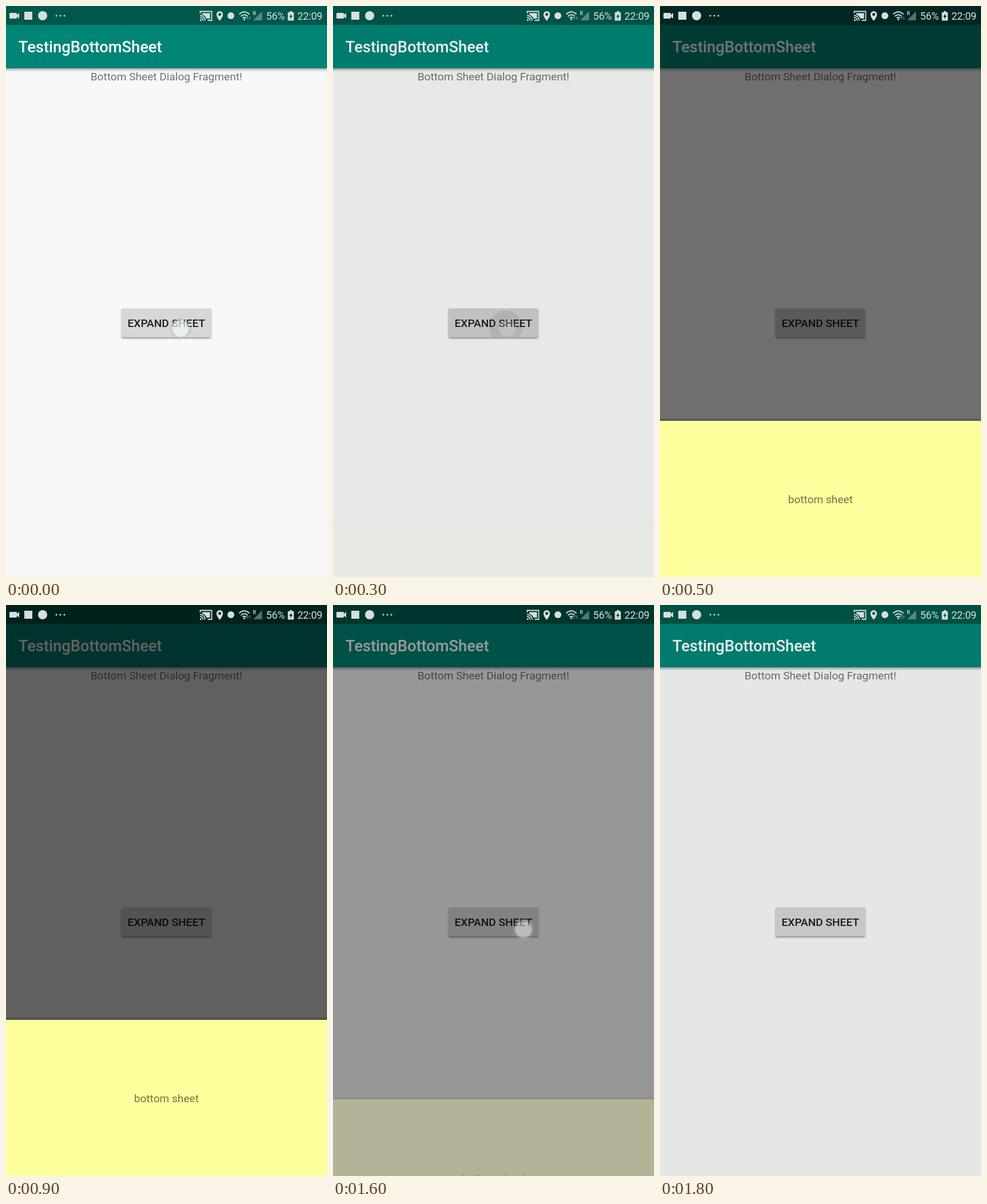
These frames come from a looping animation (561x998 px, 3800 ms). An HTML page:

```html
<!DOCTYPE html>
<html lang="en">
<head>
<meta charset="utf-8">
<title>Bottom sheet</title>
<style>
  html, body { margin: 0; width: 100%; height: 100%; overflow: hidden; }
  svg { display: block; width: 561px; height: 998px; font: 19.1px Roboto, sans-serif; }
  .medium { font-weight: 500; }
  .center { text-anchor: middle; }
  .status { font-size: 18px; letter-spacing: -.2px; }
  .line { fill: none; stroke: #d6dfdd; stroke-width: 1.8; }
</style>
</head>
<body>
<svg viewBox="0 0 561 998">
  <defs>
    <linearGradient id="shade" x2="0" y2="1">
      <stop stop-opacity=".3"/><stop offset="1" stop-opacity="0"/>
    </linearGradient>
    <radialGradient id="touch">
      <stop offset=".68" stop-color="#f4f7f7" stop-opacity=".95"/>
      <stop offset=".75" stop-color="#a4c2c6" stop-opacity=".7"/>
      <stop offset="1" stop-color="#a4c2c6" stop-opacity="0"/>
    </radialGradient>
    <filter id="soft" x="-10%" y="-20%" width="120%" height="150%">
      <feGaussianBlur stdDeviation="1.5"/>
    </filter>
    <clipPath id="buttonArea"><rect x="201.5" y="528.5" width="157.5" height="50.5" rx="2.5"/></clipPath>
  </defs>

  <!-- Activity -->
  <rect width="561" height="998" fill="#f7f9f8"/>
  <rect y="109" width="561" height="6" fill="url(#shade)"/>
  <rect width="561" height="109" fill="#008577"/>
  <rect width="561" height="33" fill="#00574b"/>
  <text class="medium" x="21.8" y="81" font-size="27.3" fill="#fff">TestingBottomSheet</text>
  <text class="center" x="280.3" y="130" fill-opacity=".54">Bottom Sheet Dialog Fragment!</text>
  <rect x="202" y="531" width="156.5" height="50" rx="2.5" fill-opacity=".4" filter="url(#soft)"/>
  <g clip-path="url(#buttonArea)">
    <rect x="201" y="528" width="159" height="52" fill="#d6d7d6"/>
    <rect id="press" x="201" y="528" width="159" height="52"/>
    <circle id="ripple" cx="302" cy="561"/>
  </g>
  <text class="medium center" x="280.3" y="561" fill="#1c1d1c">EXPAND SHEET</text>

  <!-- Dialog -->
  <rect id="dim" width="561" height="998"/>
  <g id="sheet">
    <rect y="-5" width="561" height="5" fill="url(#shade)" transform="scale(1 -1) translate(0 5)"/>
    <rect width="561" height="300" fill="#fdfe9c"/>
    <text class="center" x="280.3" y="144" fill-opacity=".54">bottom sheet</text>
  </g>

  <!-- Status bar -->
  <g fill="#d6dfdd">
    <path d="M7.5 12h10q1.500 0 1.500 1.500v2l4-3.500v10l-4-3.500v2q0 1.500-1.500 1.500h-10q-1.500 0-1.500-1.500v-7q0-1.500 1.500-1.500z"/>
    <rect x="32" y="10" width="14" height="14"/>
    <circle cx="64" cy="17" r="8"/>
    <circle cx="88" cy="17" r="1.500"/><circle cx="95" cy="17" r="1.500"/><circle cx="102" cy="17" r="1.500"/>
    <path class="line" d="M339.500 13v-3.500h20v15.500h-7M339 16.500a9 9 0 0 1 9 9M339 20a5.500 5.500 0 0 1 5.500 5.500"/>
    <path d="M343 12.500h13.500v9.500h-6q-2-5-7.500-7zM339 23a3 3 0 0 1 3 3h-3z"/>
    <path fill-rule="evenodd" d="M373.500 9a5.700 5.700 0 0 1 5.700 5.700q0 4.300-5.700 11.300q-5.700-7-5.700-11.300a5.700 5.700 0 0 1 5.700-5.700zm0 3.300a2.500 2.500 0 1 0 .1 0z"/>
    <circle cx="393" cy="17" r="6"/>
    <path class="line" d="M407.500 14.500q9-8.500 18 0M410.500 18q6-5.500 12 0M413.500 21q3-2.500 6 0"/>
    <circle cx="416.500" cy="23.300" r="1.600"/>
    <path opacity=".4" d="M420 21l2-3 2 3h-1.300v3h-1.400v-3zM424 21h1.300v-3h1.400v3h1.300l-2 3zM447.500 9.500v15.500h-15.500z"/>
    <text class="medium" x="431.500" y="16" font-size="8.500">R</text>
    <text class="status" x="454.500" y="24">56%</text>
    <path fill-rule="evenodd" d="M496 9h4v2h3v14.500h-10.500v-14.500h3.500zM499 13l-4 6h2.500l-1 4.500 4.500-6.500h-2.700z"/>
    <text class="status" x="553" y="24" text-anchor="end">22:09</text>
  </g>
  <circle id="pointer" r="20" fill="url(#touch)"/>
</svg>
<script>
const LOOP = 3800, STEP = 100;
const SHEET_TOP = 725, SHEET_TRAVEL = 193;

// Each track is a list of [time, value] points joined by straight lines.
const tracks = {
  dim: [[200, 0], [300, .065], [400, .31], [500, .55], [600, .61], [1400, .61], [1500, .55], [1600, .395], [1800, .075]],
  sheet: [[260, 0], [300, .07], [400, .75], [500, 1], [1400, 1], [1500, .82], [1600, .28], [1700, 0]],
  press: [[0, 0], [300, .035], [500, .07], [700, 0]],
  ripple: [[0, 0], [300, 29], [500, 50]],
  rippleFade: [[0, .08], [300, .08], [500, 0]],
  pointer: [[0, .75], [300, .25], [400, 0], [1300, 0], [1400, .85], [1500, .75], [1600, .52], [1800, 0]],
};

function valueAt(points, t) {
  const next = points.findIndex(([time]) => time > t);
  if (next === 0) return points[0][1];
  if (next < 0) return points.at(-1)[1];
  const [t0, v0] = points[next - 1], [t1, v1] = points[next];
  return v0 + (v1 - v0) * (t - t0) / (t1 - t0);
}

const set = (id, attributes) => {
  const element = document.getElementById(id);
  for (const name in attributes) element.setAttribute(name, attributes[name]);
};

function draw() {
  const t = Math.floor(performance.now() % LOOP / STEP) * STEP;
  const now = name => valueAt(tracks[name], t);
  const shown = now('sheet');
  set('dim', { opacity: now('dim') });
  set('sheet', { opacity: shown, transform: `translate(0 ${SHEET_TOP + SHEET_TRAVEL * (1 - shown)})` });
  set('press', { opacity: now('press') });
  set('ripple', { r: now('ripple'), opacity: now('rippleFade') });
  set('pointer', { cx: t < 1000 ? 305 : 333, cy: t < 1000 ? 564 : 567, opacity: now('pointer') });
  requestAnimationFrame(draw);
}
draw();
</script>
</body>
</html>
```
